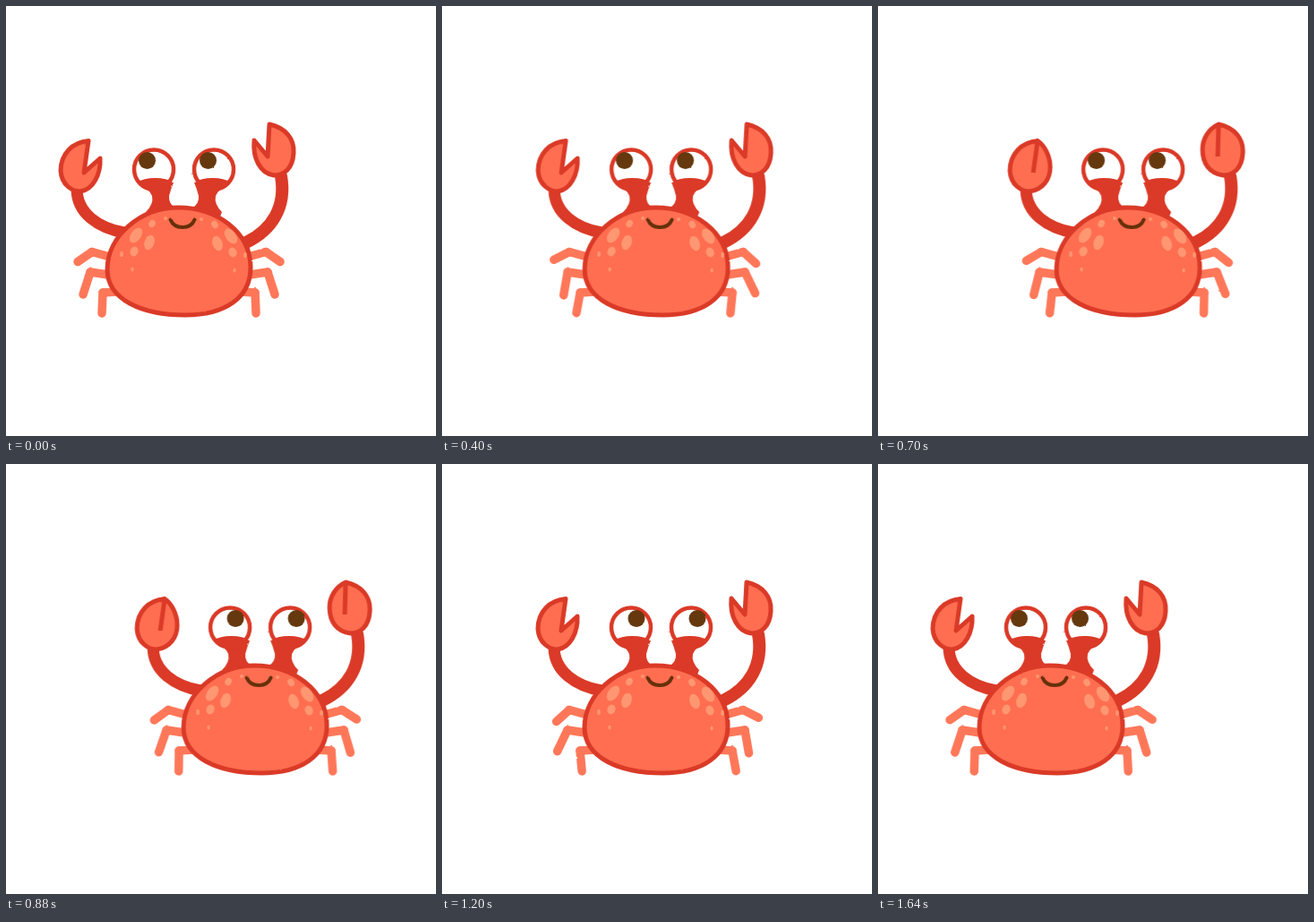
Write an HTML page that moves like this. It is 480 px wide and 480 px high and loops after 1660 ms.

```html
<!DOCTYPE html>
<html lang="en">
<head>
<meta charset="utf-8">
<title>Crab walk</title>
<style>
  html, body { margin: 0; width: 100%; height: 100%; overflow: hidden; background: #fff; }
  svg { display: block; width: 100vw; height: 100vh; }
  .line { fill: none; stroke: #da3a27; stroke-linecap: round; }
  .shell { fill: #ff6e50; stroke: #da3a27; stroke-width: 5; stroke-linejoin: round; }
  .red { fill: #da3a27; }
  .leg { fill: none; stroke: #ff7759; stroke-width: 9.5; stroke-linecap: round; stroke-linejoin: round; }
  .spots { fill: #ff9772; }
</style>
</head>
<body>
<svg viewBox="0 0 480 480">
  <defs>
    <filter id="crayon" filterUnits="userSpaceOnUse" x="40" y="110" width="310" height="260" color-interpolation-filters="sRGB">
      <feTurbulence type="fractalNoise" baseFrequency=".3" seed="4"/>
      <feDisplacementMap in="SourceGraphic" scale="1.8" xChannelSelector="R" yChannelSelector="G"/>
    </filter>
    <g id="eye">
      <path class="red" d="M146 197Q160 204 163 212Q165 221 156 230L160 240H194L190 226Q181 221 182 212Q184 204 187 197Z"/>
      <circle cx="165" cy="182.5" r="22" fill="#fff"/>
      <path class="red" d="M146 197Q154 192 166 192Q180 192 186 197Q183 206 166 207Q152 206 146 197Z"/>
      <circle class="line" cx="165" cy="182.5" r="22" stroke-width="4.5"/>
    </g>
    <g id="spots" class="spots">
      <ellipse rx="5.8" ry="9.5" transform="translate(145 256) rotate(35)"/>
      <ellipse rx="5.5" ry="8.5" transform="translate(160 264) rotate(20)"/>
      <ellipse rx="4.5" ry="5.5" transform="translate(143 274) rotate(20)"/>
      <ellipse rx="3.6" ry="4.4" transform="translate(163 243) rotate(30)"/>
      <ellipse rx="1.8" ry="3.2" cx="129" cy="277"/>
      <ellipse rx="1.6" ry="2.6" cx="141" cy="294"/>
      <circle r="2" cx="178" cy="237"/>
    </g>
  </defs>
  <g id="crab" filter="url(#crayon)">
    <g id="left-legs" class="leg"></g>
    <g id="right-legs" class="leg" transform="matrix(-1 0 0 1 386 0)"></g>
    <path class="line" stroke-width="13" d="M132 253C104 248 79 232 79 204"/>
    <path class="line" stroke-width="14" d="M268 264C297 250 313 224 307 190"/>
    <use href="#eye"/>
    <use href="#eye" transform="matrix(-1 0 0 1 397 0)"/>
    <g id="pupils" fill="#66380e">
      <circle cx="157.500" cy="172.500" r="9.500"/>
      <circle cx="225.500" cy="172.500" r="9.500"/>
    </g>
    <path class="shell" d="M192 225C150 225 113 257 113 294C113 328 152 345 200 345C244 345 273 326 273 292C273 252 235 225 192 225Z"/>
    <use href="#spots"/>
    <use href="#spots" transform="matrix(-1 0 0 1 396 1)"/>
    <path d="M183.500 238.500Q187 247 197 247Q207 247 210.500 238.500" fill="none" stroke="#66300a" stroke-width="4" stroke-linecap="round"/>
    <g id="open" class="shell">
      <path d="M92 150.500C74 152 61 165 61 184C62 200 74 207 83 207C97 205 106 188 105 170L87 186Z"/>
      <path d="M294 132C312 136 322 148 321 164C320 182 310 189 299 189C284 187 275 170 277 150L292 168Z"/>
    </g>
    <g id="closed" class="shell">
      <path d="M92 150.500C74 152 61 165 61 184C62 200 74 207 83 207C98 205 106 193 106 180C106 168 100 156 92 150.500L87 186"/>
      <path d="M294 132C312 136 322 148 321 164C320 182 310 189 299 189C284 187 276 176 276 160C276 148 283 137 294 132L293 168"/>
    </g>
  </g>
</svg>
<script>
  const LOOP = 1660;
  const byId = id => document.getElementById(id);
  const shift = (id, x) => byId(id).setAttribute('transform', `translate(${x} 0)`);
  const show = (id, on) => byId(id).setAttribute('visibility', on ? 'visible' : 'hidden');
  const ramp = (t, from, to) => Math.min(1, Math.max(0, (t - from) / (to - from)));

  // Thigh from hip to knee; the shin turns around the knee.
  const legShapes = [
    { hip: '116 280', knee: '96 274.5', shin: '-16 11' },
    { hip: '114 300', knee: '94 297', shin: '-8 25' },
    { hip: '124 319', knee: '108 320', shin: '-1 23' }
  ];

  function addPath(parent, d) {
    const path = document.createElementNS('http://www.w3.org/2000/svg', 'path');
    path.setAttribute('d', d);
    parent.append(path);
    return path;
  }

  const shins = ['left-legs', 'right-legs'].flatMap((side, s) =>
    legShapes.map(({ hip, knee, shin }, i) => {
      addPath(byId(side), `M${hip}L${knee}`);
      return { knee, path: addPath(byId(side), `M0 0L${shin}`), sign: (s + i) % 2 ? -1 : 1 };
    }));

  // The walk out is a little quicker than the walk back.
  const swing = (t, middle, half) => 44.5 * (1 + Math.sin(Math.PI * (t - middle) / half));
  const walk = t => t < 780 ? swing(t, 390, 800) : swing(t, 1210, -900);

  function draw(t) {
    shift('crab', walk(t));
    shift('pupils', 13.5 * (ramp(t, 700, 840) - ramp(t, 1520, 1640)));

    const pinched = t >= 480 && t < 1040;
    show('closed', pinched);
    show('open', !pinched);

    const turn = 8 * Math.sin(2 * Math.PI * t / LOOP);
    for (const { knee, path, sign } of shins) {
      path.setAttribute('transform', `translate(${knee}) rotate(${sign * turn})`);
    }
  }

  draw(0);
  requestAnimationFrame(function first(start) {
    (function frame(now) {
      draw((now - start) % LOOP);
      requestAnimationFrame(frame);
    })(start);
  });
</script>
</body>
</html>
```
